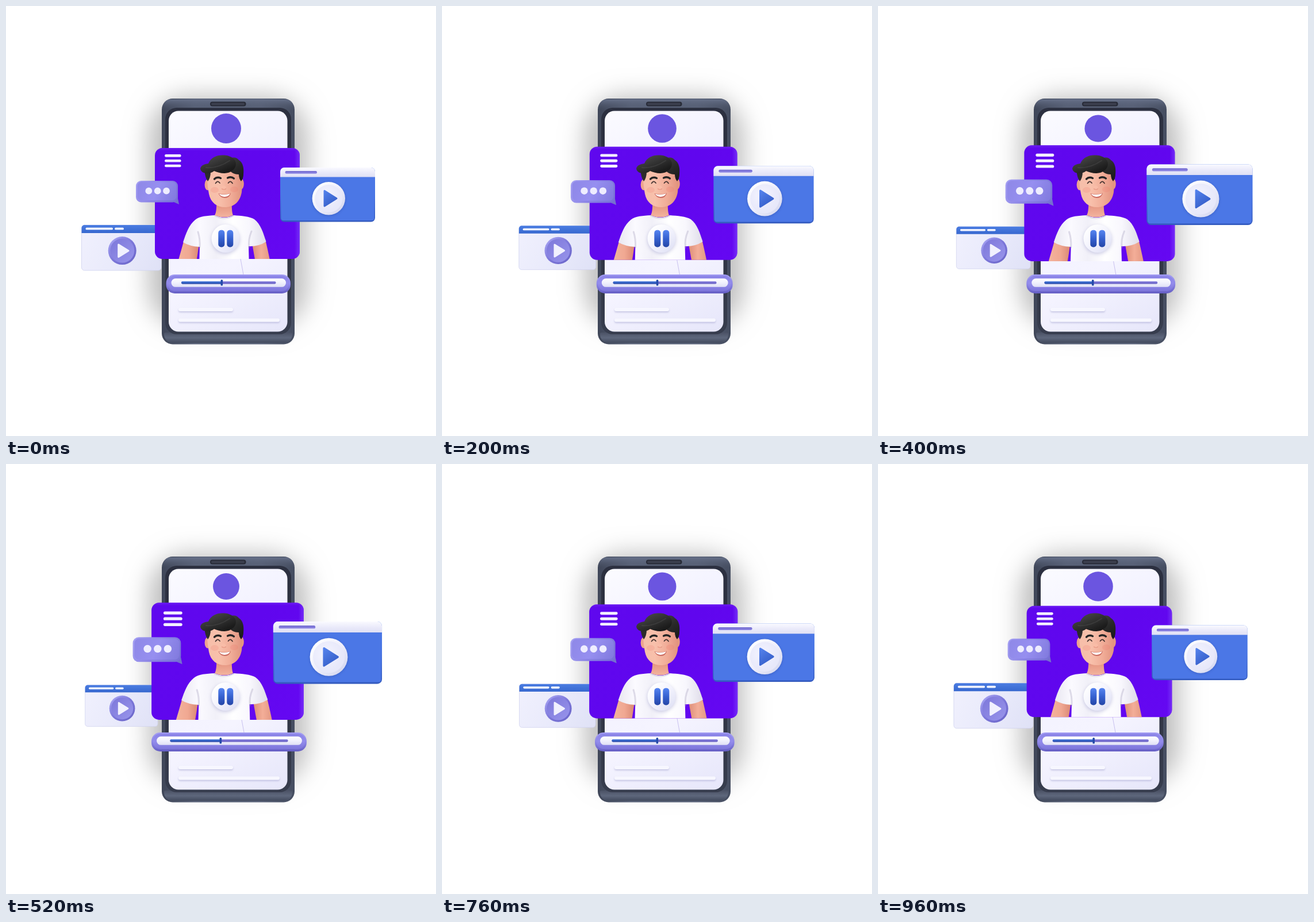
An HTML page with a canvas that plays this animation: 748 by 748 pixels, repeating every 1 s.

```html
<!DOCTYPE html>
<html lang="en">
<head>
<meta charset="utf-8">
<title>Video player</title>
<style>
html, body { margin: 0; width: 100%; height: 100%; overflow: hidden; background: #fff; }
canvas { display: block; width: 100vw; height: 100vh; }
</style>
</head>
<body>
<canvas id="stage" width="748" height="748"></canvas>
<script>
const ctx = document.getElementById('stage').getContext('2d');
const LOOP = 1000, STEP = 40;
const UP = 15, PEAK = 510, DOWN = 990;

// Evenly spaced colour stops between two points
function linear(x0, y0, x1, y1, ...colors) {
  const g = ctx.createLinearGradient(x0, y0, x1, y1);
  colors.forEach((c, i) => g.addColorStop(i / (colors.length - 1), c));
  return g;
}

function radial(x, y, r, ...colors) {
  const g = ctx.createRadialGradient(x, y, 0, x, y, r);
  colors.forEach((c, i) => g.addColorStop(i / (colors.length - 1), c));
  return g;
}

// Rounded box given by its edges
function box(l, t, r, b, radius, fill) {
  ctx.beginPath();
  ctx.roundRect(l, t, r - l, b - t, radius);
  ctx.fillStyle = fill;
  ctx.fill();
}

function oval(x, y, rx, ry, fill) {
  ctx.beginPath();
  ctx.ellipse(x, y, rx, ry, 0, 0, Math.PI * 2);
  ctx.fillStyle = fill;
  ctx.fill();
}

function shape(d, fill) {
  ctx.fillStyle = fill;
  ctx.fill(new Path2D(d));
}

function line(d, color, width) {
  ctx.strokeStyle = color;
  ctx.lineWidth = width;
  ctx.lineCap = 'round';
  ctx.stroke(new Path2D(d));
}

function shadow(color, blur, y = 0, x = 0) {
  ctx.shadowColor = color;
  ctx.shadowBlur = blur;
  ctx.shadowOffsetX = x;
  ctx.shadowOffsetY = y;
}

function group(draw) {
  ctx.save();
  draw();
  ctx.restore();
}

function scaled(x, y, sx, sy, draw) {
  group(() => {
    ctx.translate(x, y);
    ctx.scale(sx, sy);
    ctx.translate(-x, -y);
    draw();
  });
}

function triangle(l, t, r, b, color) {
  const d = `M${l} ${t}L${r} ${(t + b) / 2}L${l} ${b}Z`;
  ctx.lineJoin = 'round';
  line(d, color, 3);
  shape(d, color);
}

function drawPhone() {
  // Only the shadow of this box lands on the stage
  group(() => {
    shadow('rgba(0,0,0,.25)', 42, 0, 2000);
    box(-1752, 156, -1475, 560, 70, '#000');
  });
  box(271, 161, 502, 588.5, 19, linear(271, 0, 502, 0, '#3f4658', '#596278', '#566075', '#596278', '#454d60'));
  box(272.5, 162.5, 500.5, 180, [17, 17, 4, 4], linear(0, 162, 0, 180, '#67718a', 'rgba(80,88,108,0)'));
  box(275, 568, 498, 586, [2, 2, 15, 15], linear(0, 568, 0, 586, '#4b5265', '#5e677c', '#424a5d'));
  box(277, 177, 496, 571, 20, linear(0, 177, 0, 571, '#2c3040', '#2e3241', '#373d4e'));
  box(355, 166.5, 417.5, 174.5, 4, '#282b37');
  box(357, 168.5, 415, 172.5, 2, '#3b3f4e');
  box(283, 182.5, 489.5, 566.5, 17, linear(283, 183, 489, 566, '#fbfbff', '#f2f1ff', '#f5f4ff', '#e6e6fa'));
  group(() => {
    shadow('rgba(120,120,180,.35)', 3, 2);
    box(300, 525, 395, 531, 3, '#f7f7ff');
    box(300, 543.5, 476, 549.5, 3, '#f7f7ff');
  });
}

function drawSmallCard() {
  box(131.5, 381, 270, 460, 5, linear(131, 394, 270, 460, '#f0f0fd', '#e9eafb', '#dfe1f6'));
  ctx.strokeStyle = '#cfd2ee';
  ctx.lineWidth = .8;
  ctx.stroke();
  box(131.5, 381, 270, 395, [5, 5, 0, 0], linear(0, 381, 0, 395, '#4b7de2', '#3768cf'));
  box(138.5, 385.5, 186, 389.3, 2, '#f3f5ff');
  box(189, 385.5, 205, 389.3, 2, '#f3f5ff');
  oval(202.2, 425.6, 24.5, 24.5, linear(182, 405, 222, 446, '#a5a2f2', '#7d78da', '#6c67ca'));
  oval(202.2, 425.6, 21, 21, linear(186, 408, 220, 442, '#7f7adb', '#9692ea'));
  triangle(195.7, 415, 213, 436.5, '#f1f1fe');
}

function drawLogo() {
  oval(383, 213, 26, 26, '#6b55e0');
}

function drawBody() {
  const skin = linear(301, 0, 336, 0, '#f3b29c', '#f0a892', '#d98773');
  shape('M310 406L336 412Q334 428 330 452L297 452Q304 428 310 406Z', skin);
  shape('M428 412L451 406Q455 422 461 452L435 452Q431 430 428 412Z',
    linear(428, 0, 460, 0, '#dd8d78', '#f3ae98', '#e39782'));
  shape('M363 364Q380 372 396 364C409 365 424 366 432 371C443 379 448 396 452.5 410Q440 418 425 418L422 418L423 456L336 456L337 419Q319 418 308 411C313 396 318 381 329 372C337 365 350 365 363 364Z',
    linear(308, 0, 452, 0, '#e9e7f1', '#fbfaff', '#f1f0f8', '#ffffff', '#f8f7fd', '#dfdde9'));
  line('M334 393Q338 406 337 420', 'rgba(165,160,190,.35)', 3);
  line('M427 392Q421 406 423 420', 'rgba(165,160,190,.35)', 3);
  line('M363 365Q380 374 396 365', '#dfdde8', 2);
}

function drawHead() {
  shape('M366 335L393 335Q392 358 395 364Q380 371 363 364Q367 358 366 335Z',
    linear(0, 335, 0, 368, '#d17f6b', '#e99d88', '#f3b49f'));
  oval(350.8, 311, 5.2, 9.5, '#eda48f');
  oval(408.8, 309.5, 5, 9.5, '#e59782');
  shape('M350 281L409 281Q412 306 410 324C407 341 396 350 381 350C367 350 356 342 353 327Q349 308 350 281Z',
    linear(350, 0, 411, 0, '#f6bea9', '#f8c0ab', '#f1ad98', '#e1927e'));
  oval(363, 320, 7, 5, 'rgba(238,130,115,.22)');
  oval(397, 319, 7, 5, 'rgba(238,120,105,.22)');

  shape('M386 266C396 261 402 264 405 268C413 273 414 283 413 293Q413 300 409 305Q405 300 405 293C398 293 391 290 386 283Z',
    linear(385, 262, 413, 302, '#424242', '#292929', '#191919'));
  shape('M345.5 286L356 288Q356 299 351 305Q346 298 345.5 286Z', '#2b2b2b');
  shape('M338 283C339 277 345 275 352 274C356 264 366 259.5 376 259.5C389 259 400 265 400 275C399 285 391 290.5 380 291C373 291 367 289 362 287C355 293 340 293 338 283Z',
    linear(358, 259, 372, 292, '#484848', '#323232', '#1b1b1b'));
  line('M348 281Q368 283 389 269', 'rgba(95,95,95,.3)', 2);

  line('M362.5 301Q367 296.5 373.5 299.5', '#252525', 3.3);
  line('M385.5 299Q392 296 396.5 300', '#252525', 3.3);
  line('M364.5 308.5Q368 302.5 372 308', '#40302e', 1.7);
  line('M386.5 308Q390.5 302.5 394 308.5', '#40302e', 1.7);
  oval(378.5, 316, 4, 3.4, '#f9bca7');
  line('M375.5 318Q379 320.5 382.5 318', 'rgba(205,105,90,.45)', 1.2);
  shape('M369.5 326Q380 329 391 325.5Q389 334 380.5 334Q372 333 369.5 326Z', '#c9695f');
  shape('M370.5 326.7Q380 329.5 390 326.3Q387 332 380 332Q374 331.5 370.5 326.7Z', '#fff');
}

function drawMainCard(p) {
  const l = 259 - 6 * p, t = 247 - 6 * p, r = 511 + 7 * p, b = 440 + 5 * p;
  line(`M${408 + 2 * p} ${b}L${413 + 2 * p} ${b + 27}`, 'rgba(150,135,220,.6)', .8);
  box(l, t, r, b, 13, linear(l, t, r, b, '#5f08ee', '#6006ee', '#6508f2'));
  group(() => {
    ctx.clip();
    box(r - 9, t, r, b, 0, linear(r - 9, 0, r, 0, 'rgba(125,65,250,0)', 'rgba(125,65,250,.65)'));
    box(l, t, r, t + 5, 0, linear(0, t, 0, t + 5, 'rgba(125,60,250,.4)', 'rgba(125,60,250,0)'));
    scaled(381, 365, 1 + .04 * p, 1, drawBody);
    drawHead();
  });
  group(() => {
    shadow('rgba(130,130,190,.4)', 6, 2);
    oval(382, 404.5, 24.5, 24.5, linear(364, 386, 400, 424, '#ffffff', '#f3f3fd', '#e1e2f5'));
  });
  const blue = linear(0, 390, 0, 420, '#5584f0', '#3560cf', '#2445a5');
  box(369.3, 389.7, 380.3, 419.5, 5, blue);
  box(384.3, 389.7, 395.3, 419.5, 5, blue);
}

function drawMenu() {
  for (const y of [260.4, 269.2, 278]) box(276, y - 2.3, 304.6, y + 2.3, 2.3, '#f4f0ff');
}

function drawChat() {
  shape('M287 339L301 345L298 330Z', '#756fce');
  box(226, 304, 299, 341.5, 9, linear(226, 304, 299, 341, '#a5a0f3', '#8a83e5', '#7670d4'));
  box(228.5, 306, 296.5, 338, 7, linear(228, 306, 296, 338, '#8e88e7', '#968ff0', '#817ade'));
  for (const x of [248.3, 263.7, 279]) oval(x, 321.7, 5.9, 5.9, '#eeedff');
}

function drawBigCard() {
  box(477, 281, 642, 375.5, 7, linear(0, 281, 0, 375, '#4c7be8', '#4774e2', '#345bbf'));
  box(478.5, 296, 640.5, 373, 4, '#4b77e6');
  box(477, 281, 642, 297.5, [7, 7, 0, 0], linear(0, 281, 0, 298, '#fafaff', '#eaeafa', '#dedff4'));
  box(485.5, 287, 541, 291.7, 2.3, linear(0, 287, 0, 292, '#7169cf', '#938ce7'));
  group(() => {
    shadow('rgba(35,65,155,.4)', 5, 1);
    oval(561.3, 334.8, 28.7, 28.7, linear(540, 312, 584, 358, '#ffffff', '#eeeefb', '#d5d8f0'));
  });
  oval(561.3, 334.8, 24, 24, radial(557, 330, 26, '#f4f4ff', '#e7e8fa'));
  triangle(554, 321.5, 575, 348, linear(553, 320, 574, 348, '#5684ee', '#3159c4'));
}

// Stretches sideways only, so the ends keep their round shape
function drawSlider(p) {
  const l = 278.5 - 26 * p, r = 495 + 28.5 * p;
  const a = 305 - 20 * p, z = 469.5 + 21.5 * p, knob = 375.3 - 2 * p;
  box(l, 467, r, 500, 15, linear(0, 467, 0, 500, '#a39df3', '#8d86e7', '#655ec4'));
  box(l + 2.5, 469, r - 2.5, 496, 13, linear(0, 469, 0, 496, '#8b84e7', '#938cec', '#7d76db'));
  box(l + 9, 474, r - 8, 488.8, 7.4, linear(0, 474, 0, 489, '#ffffff', '#f0f0fd', '#dfe0f5'));
  box(a, 479, z, 483.5, 2.2, linear(0, 479, 0, 484, '#8982df', '#6058bd'));
  box(a, 479, knob, 483.5, 2.2, linear(0, 479, 0, 484, '#477ae0', '#21459f'));
  box(knob - 1.8, 476, knob + 1.8, 486.5, 1.6, '#244aa8');
}

function draw(ms) {
  const t = Math.floor((ms % LOOP) / STEP) * STEP;
  const rise = (t - UP) / (PEAK - UP), fall = (DOWN - t) / (DOWN - PEAK);
  const p = Math.max(0, Math.min(rise, fall));
  const grow = 1 + .15 * p, shrink = 1 - .09 * p;

  ctx.clearRect(0, 0, 748, 748);
  drawPhone();
  scaled(383, 213, 1 - .12 * p, 1 - .12 * p, drawLogo);
  scaled(201, 420.3, shrink, shrink, drawSmallCard);
  drawMainCard(p);
  scaled(290.3, 269.2, grow, grow, drawMenu);
  scaled(263, 322.5, grow, grow, drawChat);
  scaled(560, 328.3, grow, grow, drawBigCard);
  drawSlider(p);
}

const start = performance.now();
function tick() {
  draw(performance.now() - start);
  requestAnimationFrame(tick);
}
tick();
</script>
</body>
</html>
```
